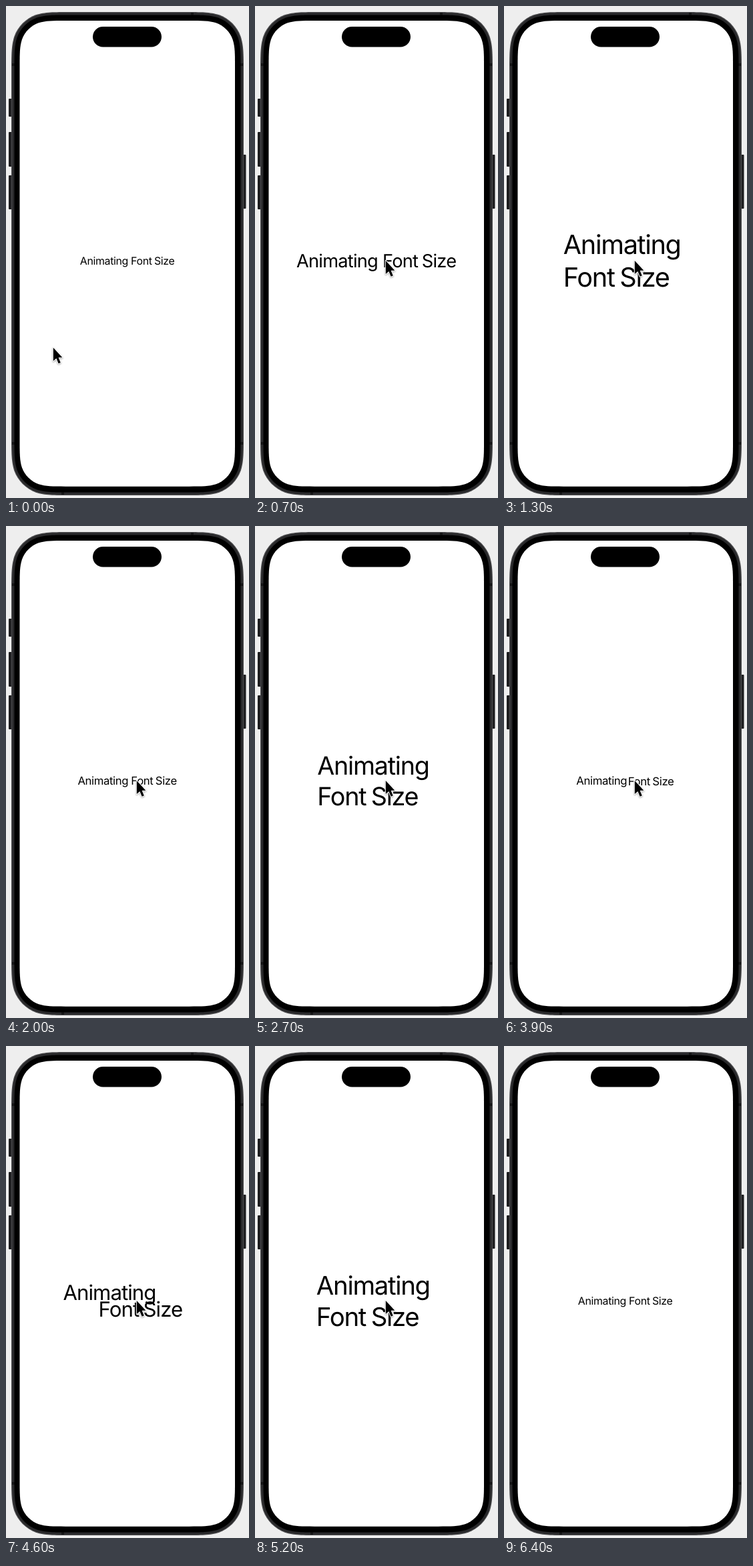
These frames come from a looping animation (364 px wide and 738 px high, 6.6 s). An HTML page:

```html
<!DOCTYPE html>
<html lang="en">
<head>
<meta charset="utf-8">
<title>Animating Font Size</title>
<style>
  html, body { margin: 0; width: 100%; height: 100%; overflow: hidden; background: #eee; }
  svg { display: block; width: 100%; height: 100%; }
  text {
    font: 400 100px Inter, "Liberation Sans", sans-serif;
    font-optical-sizing: none;
    text-rendering: geometricPrecision;
    white-space: pre;
    word-spacing: -0.05em;
  }
  #cursor { filter: drop-shadow(0 1.5px 1.2px rgba(0, 0, 0, .35)); }
</style>
</head>
<body>
<svg viewBox="0 0 364 738">
  <rect width="364" height="738" fill="#eee"/>
  <g fill="#1d1d1f">
    <rect x="4" y="139" width="7" height="27" rx="1"/>
    <rect x="4" y="189" width="7" height="52" rx="1"/>
    <rect x="4" y="254" width="7" height="51" rx="1"/>
    <rect x="352" y="223" width="7.5" height="81" rx="1"/>
  </g>
  <path id="edge" fill="#4b4b4d"/>
  <path id="body" fill="#29292b"/>
  <g fill="#161617">
    <rect x="277" y="10" width="4" height="4"/>
    <rect x="83" y="729" width="4" height="4"/>
    <rect x="9" y="86" width="4" height="4"/>
    <rect x="351" y="86" width="4" height="4"/>
    <rect x="9" y="654" width="4" height="4"/>
    <rect x="351" y="654" width="4" height="4"/>
  </g>
  <path id="bezel" fill="#000"/>
  <path id="screen" fill="#fff"/>
  <rect x="130" y="31" width="103" height="30.5" rx="15.25" fill="#000"/>
  <text id="first">Animating</text>
  <text id="second">Font Size</text>
  <path id="cursor" d="M0 0V20L4.6 16L7.8 23.8L11 22.4L7.8 14.8H13.6Z"
        fill="#000" stroke="#fff" stroke-width="2" stroke-linejoin="round" paint-order="stroke"/>
</svg>
<script>
const LOOP = 6600, STEP = 100;
const SMALL = 20, BIG = 50, WRAP = 46.6;
const POINT = 322 / 393;                 // pixels per layout point
const GLYPH = 0.97;                      // matches the cap height
const CENTER = { x: 181.6, y: 382.2 };
const LINE = 1.193, BASELINE = 0.3555, SPACE = 0.281;
const OMEGA = 2 * Math.PI / 0.55;        // critically damped spring

// blend: the words glide between the two layouts instead of rewrapping
const taps = [
  { at: 560, to: BIG },
  { at: 1540, to: SMALL },
  { at: 2343, to: BIG },
  { at: 3450, to: SMALL, blend: true },
  { at: 4410, to: BIG, blend: true },
  { at: 5166, to: SMALL }
];
const path = [[100, 70.8, 512.5], [200, 83, 510], [300, 136, 469], [400, 184, 398], [500, 195.8, 382]];
const CURSOR_GONE = 5500;

const byId = id => document.getElementById(id);
const first = byId("first"), second = byId("second"), cursor = byId("cursor");
const lerp = (a, b, p) => a + (b - a) * p;

// Continuous-curvature corner, in units of the radius
const half = [[1.5287, 0], [1.0885, 0], [0.8684, 0], [0.6315, 0.0749], [0.3728, 0.1691]];
const corner = half.concat(half.map(([x, y]) => [y, x]).reverse());

function smoothRect(id, left, top, right, bottom, r) {
  const bend = (x, y, sx, sy) => {
    const points = corner.map(([u, v]) => `${x + sx * u * r} ${y + sy * v * r}`);
    if (sx === sy) points.reverse();
    return `${points[0]}C${points.slice(1).join(" ")}`;
  };
  byId(id).setAttribute("d", "M" + [
    bend(left, top, 1, 1), bend(right, top, -1, 1),
    bend(right, bottom, -1, -1), bend(left, bottom, 1, -1)
  ].join("L") + "Z");
}

smoothRect("edge", 8, 9, 356, 734, 58);
smoothRect("body", 9.3, 10.3, 354.7, 732.7, 56.7);
smoothRect("bezel", 12.5, 13.5, 351.5, 729.5, 53.5);
smoothRect("screen", 20.5, 22, 343, 720.7, 45);

const advance = el => el.getComputedTextLength() / 100;
const firstWidth = advance(first), secondWidth = advance(second);

function spring(ms) {
  const s = OMEGA * Math.max(0, ms) / 1000;
  return 1 - (1 + s) * Math.exp(-s);
}

function pose(t) {
  const tap = taps.filter(k => k.at <= t).pop();
  if (!tap) return { size: SMALL, wrap: 0 };
  const p = spring(t - tap.at);
  const size = lerp(SMALL + BIG - tap.to, tap.to, p);
  const wrap = tap.blend ? (tap.to === BIG ? p : 1 - p) : Number(size > WRAP);
  return { size, wrap };
}

function place(el, x, y, em, track) {
  el.setAttribute("transform", `translate(${x} ${y}) scale(${em / 100})`);
  el.style.letterSpacing = track * 100 + "px";
}

function drawText(t) {
  const { size, wrap } = pose(t);
  const px = size * POINT, em = px * GLYPH;
  const track = -0.022 - 0.012 * (size - SMALL) / (BIG - SMALL);
  const a = (firstWidth + 9 * track) * em;
  const b = (secondWidth + 9 * track) * em;
  const gap = (SPACE + track) * em;
  const rowX = CENTER.x - (a + gap + b) / 2;
  const stackX = CENTER.x - (a + gap) / 2;
  const base = CENTER.y + BASELINE * px;
  const shift = wrap * LINE * px / 2;
  place(first, lerp(rowX, stackX, wrap), base - shift, em, track);
  place(second, lerp(rowX + a + gap, stackX, wrap), base + shift, em, track);
}

function drawCursor(t) {
  let i = path.findIndex(k => k[0] >= t);
  if (i < 0) i = path.length - 1;
  const to = path[i], from = path[Math.max(0, i - 1)];
  const p = to === from ? 1 : Math.min(1, (t - from[0]) / (to[0] - from[0]));
  cursor.setAttribute("transform", `translate(${lerp(from[1], to[1], p)} ${lerp(from[2], to[2], p)})`);
  cursor.style.display = t < CURSOR_GONE ? "" : "none";
}

function draw(now) {
  const t = Math.floor((now % LOOP) / STEP) * STEP;
  drawText(t);
  drawCursor(t);
}

const start = performance.now();
function frame() {
  draw(performance.now() - start);
  requestAnimationFrame(frame);
}
frame();
</script>
</body>
</html>
```
